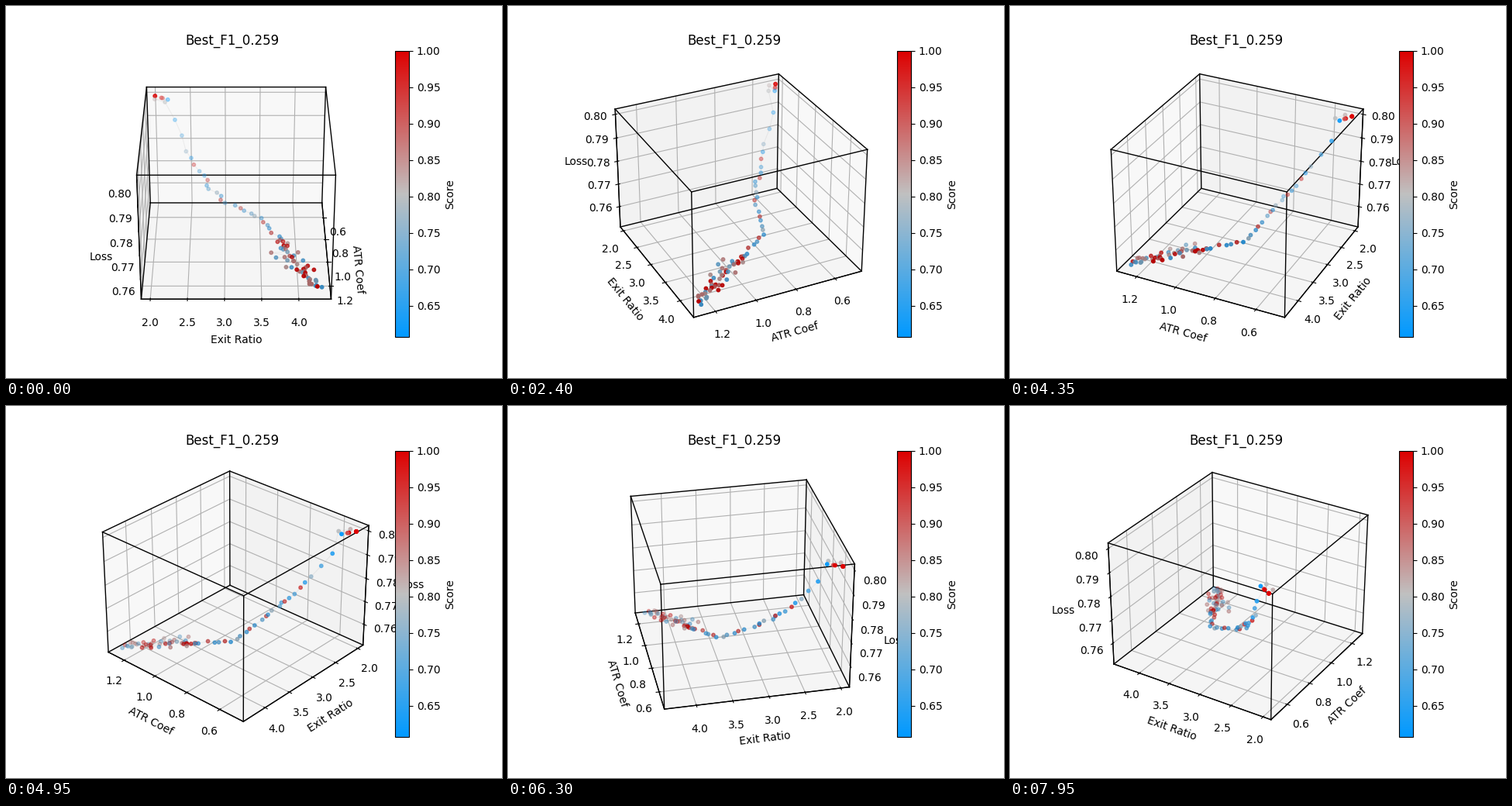
A matplotlib script that plays this animation: 640x480 px, repeating every 8 s.

```python
from itertools import combinations, product

import matplotlib.pyplot as plt
import numpy as np
from matplotlib.animation import FuncAnimation
from matplotlib.cm import ScalarMappable
from matplotlib.colors import LinearSegmentedColormap, Normalize

FRAMES, INTERVAL = 160, 50
FRAMES_PER_STEP, DEGREES_PER_STEP = 3, 4
LOW = np.array([0.461, 1.878, 0.75082])
HIGH = np.array([1.305, 4.435, 0.80222])

# Search path: step, then ATR, exit and loss as fractions of their axes.
PATH = np.array([
    (-2, .045, .048, .956), (-1, .087, .121, .954), (0, .114, .159, .804),
    (2, .200, .224, .604), (5, .262, .285, .475), (9, .326, .364, .370),
    (13, .368, .450, .285), (18, .395, .608, .200), (25, .575, .729, .149),
    (50, .940, .925, .045),
])


def on_path(steps):
    return np.column_stack(
        [np.interp(steps, PATH[:, 0], column) for column in PATH.T[1:]])


def build_points():
    """Return steps, positions and scores of all trials in path order."""
    rng = np.random.default_rng(4)

    # The best trial is visited repeatedly, with a few close by.
    start = np.array([-2, -2, -2, -2, -1.5, -1.4, -1])
    start_score = np.array([1, 1, 1, 1, 1, .92, .62])
    pale = np.array([-2, -1.2])

    descent = np.arange(26)
    descent_score = np.resize([.65, .69, .76, .64, .96, .68, .65, .95], 26)
    cluster = np.linspace(26, 50, 48)
    cluster_score = rng.choice([.68, .70, .74, .84, .87, .90, 1], 48)

    steps = np.concatenate([start, pale, descent, cluster])
    scores = np.concatenate([start_score, [.82, .80],
                             descent_score, cluster_score])
    spots = on_path(steps)
    first = len(start)
    spots[first:first + 2, 0] += .04
    spread = np.interp(steps, [0, 1, 24, 30], [0, .008, .012, .032])
    jitter = rng.normal(size=spots.shape) * [.5, 1, .1]
    spots = np.minimum(spots + spread[:, None] * jitter, .957)
    return steps, LOW + spots * (HIGH - LOW), scores


def draw_box(ax):
    for a, b in combinations(product((0, 1), repeat=3), 2):
        if sum(p != q for p, q in zip(a, b)) == 1:
            ends = LOW + np.array([a, b]) * (HIGH - LOW)
            ax.plot(*ends.T, color="black", lw=1.0)


plt.rcParams["axes3d.automargin"] = False
fig = plt.figure(figsize=(6.4, 4.8), dpi=100)
ax = fig.add_subplot(projection="3d")
cmap = LinearSegmentedColormap.from_list(
    "score", ["#0099ff", "#c0c0c0", "#dd0000"])
scale = ScalarMappable(Normalize(0.607, 1.0), cmap)

steps, points, scores = build_points()
colors = scale.to_rgba(scores)
# Later trials overlap more and look darker.
colors[:, :3] *= np.interp(steps, [0, 12], [1, .82])[:, None]

draw_box(ax)
ax.plot(*points.T, color="gray", lw=0.8, alpha=0.1)
ax.scatter(*points.T, c=colors, s=10)
fig.colorbar(scale, ax=ax, label="Score")

ax.set(title="Best_F1_0.259",
       xlabel="ATR Coef", ylabel="Exit Ratio", zlabel="Loss",
       xlim=(LOW[0], HIGH[0]), ylim=(LOW[1], HIGH[1]), zlim=(LOW[2], HIGH[2]),
       xticks=np.linspace(0.6, 1.2, 4), yticks=np.linspace(2, 4, 5),
       zticks=np.linspace(0.76, 0.80, 5))


def update(frame):
    # The tiny offset settles which side wall shows when seen face-on.
    azim = DEGREES_PER_STEP * (frame // FRAMES_PER_STEP) + 1e-3
    ax.view_init(elev=30, azim=azim)
    return ()


anim = FuncAnimation(fig, update, frames=FRAMES, interval=INTERVAL,
                     init_func=lambda: update(0), repeat=True, repeat_delay=0)
plt.show()
```
